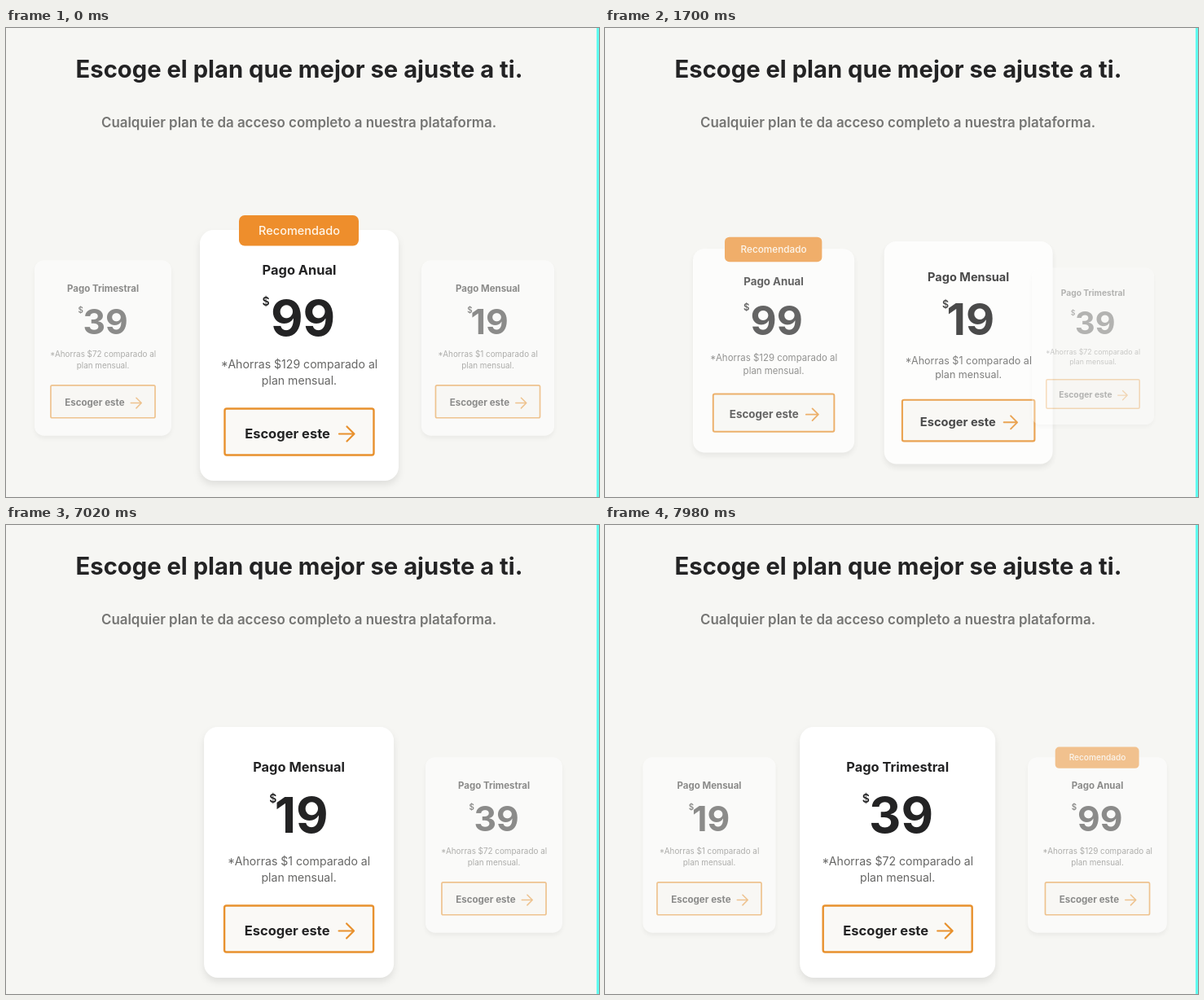
Animation of 728 by 576 pixels, one loop 8000 ms. Source, as an HTML page:

```html
<!DOCTYPE html>
<html lang="es">
<head>
<meta charset="utf-8">
<title>Planes</title>
<style>
  html, body { margin: 0; width: 100%; height: 100%; overflow: hidden; background: #f6f6f3; }
  svg { display: block; width: 728px; height: 576px; font-family: Inter, "Open Sans", sans-serif; }
  text { fill: #232324; text-anchor: middle; }
  .head { font-size: 29.2px; font-weight: 700; }
  .sub { font-size: 16.9px; font-weight: 600; fill: #757573; }
  .panel { fill: #fff; filter: drop-shadow(0 5px 4px rgba(0, 0, 0, .09)); }
  .name { font-size: 16.4px; font-weight: 700; }
  .price { font-size: 61px; font-weight: 700; }
  .coin { font-size: 14px; font-weight: 600; }
  .note { font-size: 14.1px; fill: #666665; }
  .badge { fill: #ee8e2c; }
  .tag { font-size: 14.5px; font-weight: 500; fill: #fff6ea; }
  .button { fill: #faf9f6; stroke: #e8912e; stroke-width: 2.4; }
  .action { font-size: 16.5px; font-weight: 700; }
  .arrow { fill: none; stroke: #e8912e; stroke-width: 2.2; stroke-linecap: round; stroke-linejoin: round; }
</style>
</head>
<body>
<svg id="stage" viewBox="0 0 728 576">
  <rect width="728" height="576" fill="#f6f6f3"/>
  <text class="head" x="360" y="61">Escoge el plan que mejor se ajuste a ti.</text>
  <text class="sub" x="359.5" y="122">Cualquier plan te da acceso completo a nuestra plataforma.</text>
  <g id="cards"></g>
  <rect x="725" width="3" height="576" fill="#5ffbf0"/>
</svg>
<script>
  const LOOP = 8000;
  const SLIDE = 17.7; // length of a slide, in ticks
  const SMALL = 0.7, ENTER = 0.5, FADED = 0.5, PIVOT = 372;

  // x lists the card centre in the middle, right and left slots
  const plans = [
    { name: 'Anual', price: 99, saving: 129, width: 244, priceX: 4.5, coinX: -41, x: [360, 604.5, 116], badge: true },
    { name: 'Mensual', price: 19, saving: 1, width: 233, priceX: 3, coinX: -31.7, x: [359.6, 591.5, 128] },
    { name: 'Trimestral', price: 39, saving: 72, width: 240, priceX: 4.3, coinX: -39, x: [359.2, 599, 119] }
  ];

  // at: the tick where a plan starts to slide in
  const steps = [
    { at: -SLIDE * 2, active: 0 },
    { at: 1.27, active: 0 },
    { at: 30.57, active: 1 },
    { at: 151.27, active: 2 }
  ];

  const box = (cls, x, y, w, h, r) =>
    `<rect class="${cls}" x="${x}" y="${y}" width="${w}" height="${h}" rx="${r}"/>`;
  const label = (cls, x, y, text) => `<text class="${cls}" x="${x}" y="${y}">${text}</text>`;

  const layer = document.getElementById('cards');
  const cards = plans.map(plan => {
    const g = document.createElementNS('http://www.w3.org/2000/svg', 'g');
    g.innerHTML =
      box('panel', -plan.width / 2, 248, plan.width, 308, 17) +
      (plan.badge ? box('badge', -74, 230, 147, 37.5, 7) + label('tag', 0, 254, 'Recomendado') : '') +
      label('name', 0, 303, 'Pago ' + plan.name) +
      label('coin', plan.coinX, 341, '$') +
      label('price', plan.priceX, 378, plan.price) +
      label('note', 0, 418, `*Ahorras $${plan.saving} comparado al`) +
      label('note', 0, 437.5, 'plan mensual.') +
      box('button', -91.5, 467.5, 183, 57, 2.5) +
      label('action', -14.5, 503.5, 'Escoger este') +
      '<path class="arrow" d="M49 498.5H67M58.5 489.5L67.5 498.5L58.5 507.5"/>';
    layer.append(g);
    return g;
  });

  const mix = (a, b, k) => a + (b - a) * k;

  // cubic-bezier(.25, .1, .25, 1)
  function ease(x) {
    if (x <= 0) return 0;
    if (x >= 1) return 1;
    const curve = (a, b, u) => 3 * a * u * (1 - u) ** 2 + 3 * b * u * u * (1 - u) + u ** 3;
    let lo = 0, hi = 1;
    for (let i = 0; i < 24; i++) {
      const u = (lo + hi) / 2;
      if (curve(0.25, 0.25, u) < x) lo = u; else hi = u;
    }
    return curve(0.1, 1, lo);
  }

  // Three ticks every 140 ms, shown for 20, 100 and 20 ms
  function tickAt(t) {
    const rest = t % 140;
    return 3 * Math.floor(t / 140) + (rest >= 20) + (rest >= 120);
  }

  function pose(plan, slot, k) {
    const [mid, right, left] = plan.x;
    if (slot === 0) return [mix(right, mid, k), mix(SMALL, 1, k), mix(FADED, 1, k)];
    if (slot === 1) return [right, mix(ENTER, SMALL, k), FADED * k];
    return [mix(mid, left, k), mix(1, SMALL, k), mix(1, FADED, k)];
  }

  let current = null;
  function draw(t) {
    const tick = tickAt(t);
    const step = steps.filter(s => Math.floor(s.at) <= tick).pop();
    const k = ease((tick - step.at) / SLIDE);
    if (step !== current) {
      layer.append(cards[(step.active + 1) % 3]);
      current = step;
    }
    plans.forEach((plan, i) => {
      const [x, scale, alpha] = pose(plan, (i - step.active + 3) % 3, k);
      cards[i].setAttribute('transform', `translate(${x} ${PIVOT}) scale(${scale}) translate(0 ${-PIVOT})`);
      cards[i].setAttribute('opacity', alpha);
    });
  }

  const start = performance.now();
  function play() {
    draw((performance.now() - start) % LOOP);
    requestAnimationFrame(play);
  }
  draw(0);
  requestAnimationFrame(play);
</script>
</body>
</html>
```
